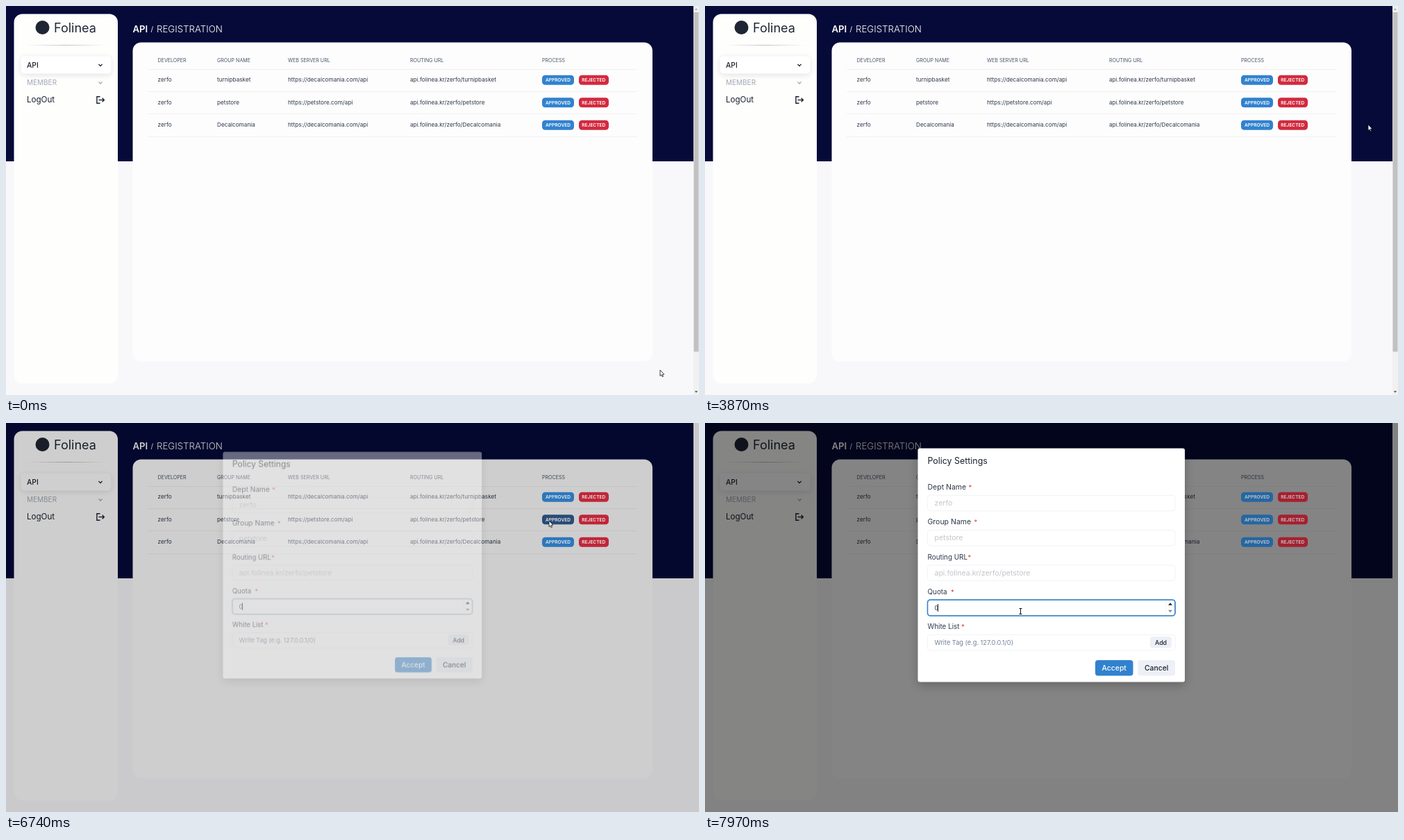
An HTML page with a canvas that plays this animation: 998 by 561 pixels, repeating every 8000 ms.

```html
<!DOCTYPE html>
<html lang="en">
<head>
<meta charset="utf-8">
<title>API registration</title>
<style>
html, body { margin: 0; width: 100%; height: 100%; overflow: hidden; background: #f8f8fb; }
canvas { display: block; }
</style>
</head>
<body>
<canvas id="stage" width="998" height="561"></canvas>
<script>
const LOOP = 8000, W = 998, H = 561;
const screen2d = document.getElementById('stage').getContext('2d');
const layer = document.createElement('canvas');
layer.width = W;
layer.height = H;
const layer2d = layer.getContext('2d');
let g = screen2d;

const BLUE = '#3182ce', RED = '#d22a3e', INK = '#2d3748';
const BRAND = 'Folinea', DEV = 'zerfo';
const ROUTE = 'api.folinea.kr/' + DEV + '/';
const ROWS = [
  { y: 106.7, group: 'turnipbasket', server: 'https://decalcomania.com/api' },
  { y: 139.2, group: 'petstore', server: 'https://petstore.com/api' },
  { y: 171.7, group: 'Decalcomania', server: 'https://decalcomania.com/api' }
];

// time, x, y of the pointer
const PATH = [
  [0, 942, 525], [900, 942, 524], [1630, 945, 469], [2470, 950, 320],
  [3300, 953, 215], [3870, 955, 171], [5400, 955, 171], [5820, 870, 172],
  [6100, 777, 148], [6400, 782, 141], [7300, 782, 141], [7850, 454.5, 271.5],
  [LOOP, 454.5, 271.5]
];

const OPEN_AT = 6709, OPEN_MS = 225;

function text(str, x, y, size, color, weight = 400, align = 'left') {
  g.font = `${weight} ${size}px Inter, sans-serif`;
  g.fillStyle = color;
  g.textAlign = align;
  g.fillText(str, x, y + size * 0.364); // y is the middle of the capitals
}

function box(x, y, w, h, r, fill, stroke, line = 1) {
  g.beginPath();
  g.roundRect(x, y, w, h, r);
  if (fill) { g.fillStyle = fill; g.fill(); }
  if (stroke) { g.strokeStyle = stroke; g.lineWidth = line; g.stroke(); }
}

function shadowBox(x, y, w, h, r, fill, shadow, blur, dy) {
  g.save();
  g.shadowColor = shadow;
  g.shadowBlur = blur;
  g.shadowOffsetY = dy;
  box(x, y, w, h, r, fill);
  g.restore();
}

function poly(points, fill, stroke, line = 1) {
  g.beginPath();
  points.forEach(([x, y], i) => i ? g.lineTo(x, y) : g.moveTo(x, y));
  if (fill) { g.closePath(); g.fillStyle = fill; g.fill(); }
  if (stroke) { g.strokeStyle = stroke; g.lineWidth = line; g.stroke(); }
}

function arrow(x, y, w, h, color) {
  poly([[x - w, y + h], [x + w, y + h], [x, y - h]], color);
}

function chevron(x, y, color) {
  poly([[x - 2.6, y - 1.3], [x, y + 1.3], [x + 2.6, y - 1.3]], null, color, 1.3);
}

function easeOut(x) {
  // cubic-bezier(0, 0, .2, 1)
  let lo = 0, hi = 1;
  for (let i = 0; i < 24; i++) {
    const s = (lo + hi) / 2;
    if (0.6 * s * s * (1 - s) + s ** 3 < x) lo = s; else hi = s;
  }
  return 3 * lo * lo * (1 - lo) + lo ** 3;
}

function pointerAt(t) {
  const i = Math.max(1, PATH.findIndex(p => p[0] > t));
  const [t0, x0, y0] = PATH[i - 1], [t1, x1, y1] = PATH[i];
  const k = (t - t0) / (t1 - t0);
  return [x0 + (x1 - x0) * k, y0 + (y1 - y0) * k];
}

function drawSidebar() {
  box(11.5, 11.5, 149.5, 533, 12, '#fefefd');
  g.fillStyle = '#1f2533';
  g.beginPath();
  g.arc(52.5, 31, 10, 0, Math.PI * 2);
  g.fill();
  text(BRAND, 69, 31, 18, '#1f2533');

  const rule = g.createLinearGradient(28, 0, 145, 0);
  rule.addColorStop(0, 'rgba(140,140,150,0)');
  rule.addColorStop(0.5, 'rgba(140,140,150,.55)');
  rule.addColorStop(1, 'rgba(140,140,150,0)');
  g.fillStyle = rule;
  g.fillRect(28, 56, 117, 1);

  shadowBox(21.5, 72.5, 130, 25, 5, '#ffffff', 'rgba(30,30,60,.12)', 8, 2);
  text('API', 30, 85, 10.3, '#1a202c', 500);
  text('MEMBER', 30, 110.5, 10, '#a3a8b5');
  text('LogOut', 30, 135, 11.6, '#1a202c');
  chevron(136, 85.2, '#1a202c');
  chevron(136, 110.7, '#a3a8b5');
  poly([[135.5, 130.7], [130.9, 130.7], [130.9, 140.3], [135.5, 140.3]], null, '#1a202c', 1.4);
  poly([[133.5, 135.5], [141, 135.5]], null, '#1a202c', 1.4);
  poly([[138.6, 132.7], [141.4, 135.5], [138.6, 138.3]], null, '#1a202c', 1.4);
}

function drawTable() {
  text('API', 182.5, 32.7, 13.2, '#ffffff', 600);
  text('/', 208.5, 33, 10, '#ffffff');
  text('REGISTRATION', 217, 32.7, 13.3, '#ffffff', 300);
  box(182.5, 52.5, 748.5, 460, 12, '#fdfdfe');

  const heads = [[218.5, 'DEVELOPER'], [304, 'GROUP NAME'], [406, 'WEB SERVER URL'],
    [582, 'ROUTING URL'], [772, 'PROCESS']];
  for (const [x, label] of heads) text(label, x, 78.5, 7.1, '#4a5568');
  g.fillStyle = '#f0f0f0';
  for (const y of [91, 123, 155, 188]) g.fillRect(204, y, 705, 1);
  for (const { y, group, server } of ROWS) {
    const mid = y - 0.5;
    text(DEV, 218.5, mid, 8.2, INK);
    text(group, 304, mid, 8.2, INK);
    text(server, 406, mid, 8.2, INK);
    text(ROUTE + group, 582, mid, 8.2, INK);
  }
}

function drawActions(t, open) {
  ROWS.forEach(({ y }, i) => {
    let fill = BLUE;
    if (i === 1 && t > 6180 && t < 7340) fill = t > 6600 && t < 6800 ? '#2c5282' : '#2b6cb0';
    box(772, y - 7, 46, 14, 4.5, fill);
    box(825, y - 7, 43, 14, 4.5, RED);
    text('APPROVED', 795, y, 6.6, '#fff', 600, 'center');
    text('REJECTED', 846.3, y, 6.6, '#fff', 600, 'center');
    g.globalAlpha = 0.22 * open;
    box(772, y - 7, 46, 14, 4.5, '#000');
    box(825, y - 7, 43, 14, 4.5, '#000');
    g.globalAlpha = 1;
  });
}

function drawScrollbar() {
  g.fillStyle = '#f1f1f1';
  g.fillRect(990, 0, 8, H);
  g.fillStyle = '#c1c1c1';
  g.fillRect(990.5, 9, 7, 489.5);
  arrow(994, 4.5, 2.2, 1.2, '#a3a3a3');
  arrow(994, 556.5, 2.2, -1.2, '#505050');
}

function drawModal(t, open) {
  shadowBox(306.5, 36.5, 384.5, 337, 3, '#ffffff', 'rgba(0,0,0,.22)', 14, 5);
  text('Policy Settings', 320.5, 54.5, 12.4, '#1a202c');

  const fields = [
    ['Dept Name', 92.3, 379.5, DEV], ['Group Name', 142.5, 387.5, 'petstore'],
    ['Routing URL', 193, 378.5, ROUTE + 'petstore'], ['Quota', 243, 354, ''],
    ['White List', 293.5, 369, '']
  ];
  for (const [label, y, star, value] of fields) {
    text(label, 320.5, y, label.includes('Name') ? 10.5 : 9.9, INK);
    text('*', star, y + 0.5, 9.5, '#e53e3e');
    box(320.5, y + 12, 356.5, 22.5, 4, null, '#f1f2f5');
    text(value, 330.5, y + 22.8, 10.5, '#c3c5cb');
  }

  box(320.5, 255, 356.5, 23, 4, '#fff', '#a0aec0');
  g.globalAlpha = open * open;
  box(320.5, 255, 356.5, 23, 4, null, BLUE, 1.6);
  g.globalAlpha = 1;
  g.fillStyle = '#f3f3f3';
  g.fillRect(663.5, 256.5, 1, 20);
  arrow(670, 261, 3, 1.8, '#222222');
  arrow(670, 271.5, 3, -1.8, '#8a8a8a');
  text('0', 330.5, 266.5, 8.6, INK);
  if (Math.floor((t - 6700) / 500) % 2 === 0) {
    g.fillStyle = '#1a202c';
    g.fillRect(335, 261, 1, 11);
  }

  text('Write Tag (e.g. 127.0.0.1/0)', 330.5, 316.3, 9.2, '#718096');
  box(641, 308, 31, 16.5, 4, '#edf0f6');
  text('Add', 656.5, 316.3, 8.9, '#1a202c', 500, 'center');
  box(562, 342, 54.5, 22.5, 4, BLUE);
  text('Accept', 589.2, 353, 10.4, '#ffffff', 500, 'center');
  box(623.5, 342, 53.5, 22.5, 4, '#edf0f6');
  text('Cancel', 650.2, 353, 10.4, '#1a202c', 500, 'center');
}

function drawPointer(t) {
  const [x, y] = pointerAt(t);
  // text caret pointer over the quota field
  if (t > 7500 && y > 255 && x < 677) {
    g.fillStyle = '#111111';
    g.fillRect(x - 0.5, y - 4, 1, 8);
    g.fillRect(x - 2, y - 4.5, 4, 1);
    g.fillRect(x - 2, y + 3.5, 4, 1);
    return;
  }
  const shape = [[0, 0], [0, 8.6], [1.9, 6.9], [3.2, 9.8], [4.5, 9.2], [3.2, 6.4], [5.8, 6.2], [0, 0]];
  poly(shape.map(([dx, dy]) => [x + dx, y + dy]), '#ffffff', '#111111', 0.8);
}

function draw(t) {
  const open = easeOut(Math.min(1, Math.max(0, (t - OPEN_AT) / OPEN_MS)));
  g = screen2d;
  g.fillStyle = '#f8f8fb';
  g.fillRect(0, 0, W, H);
  g.fillStyle = '#050a38';
  g.fillRect(0, 0, 990, 224);
  drawSidebar();
  drawTable();

  if (open > 0) {
    g.fillStyle = `rgba(0,0,0,${0.48 * open})`;
    g.fillRect(0, 0, W, H);
  } else {
    drawScrollbar();
  }
  drawActions(t, open);

  if (open > 0) {
    g = layer2d;
    g.clearRect(0, 0, W, H);
    drawModal(t, open);
    g = screen2d;
    const k = 0.95 + 0.05 * open, cx = 498.75, cy = 205;
    g.save();
    g.globalAlpha = open;
    g.translate(cx * (1 - k), cy * (1 - k));
    g.scale(k, k);
    g.drawImage(layer, 0, 0);
    g.restore();
  }
  drawPointer(t);
}

const start = performance.now();
function tick() {
  draw((performance.now() - start) % LOOP);
  requestAnimationFrame(tick);
}
tick();
</script>
</body>
</html>
```
